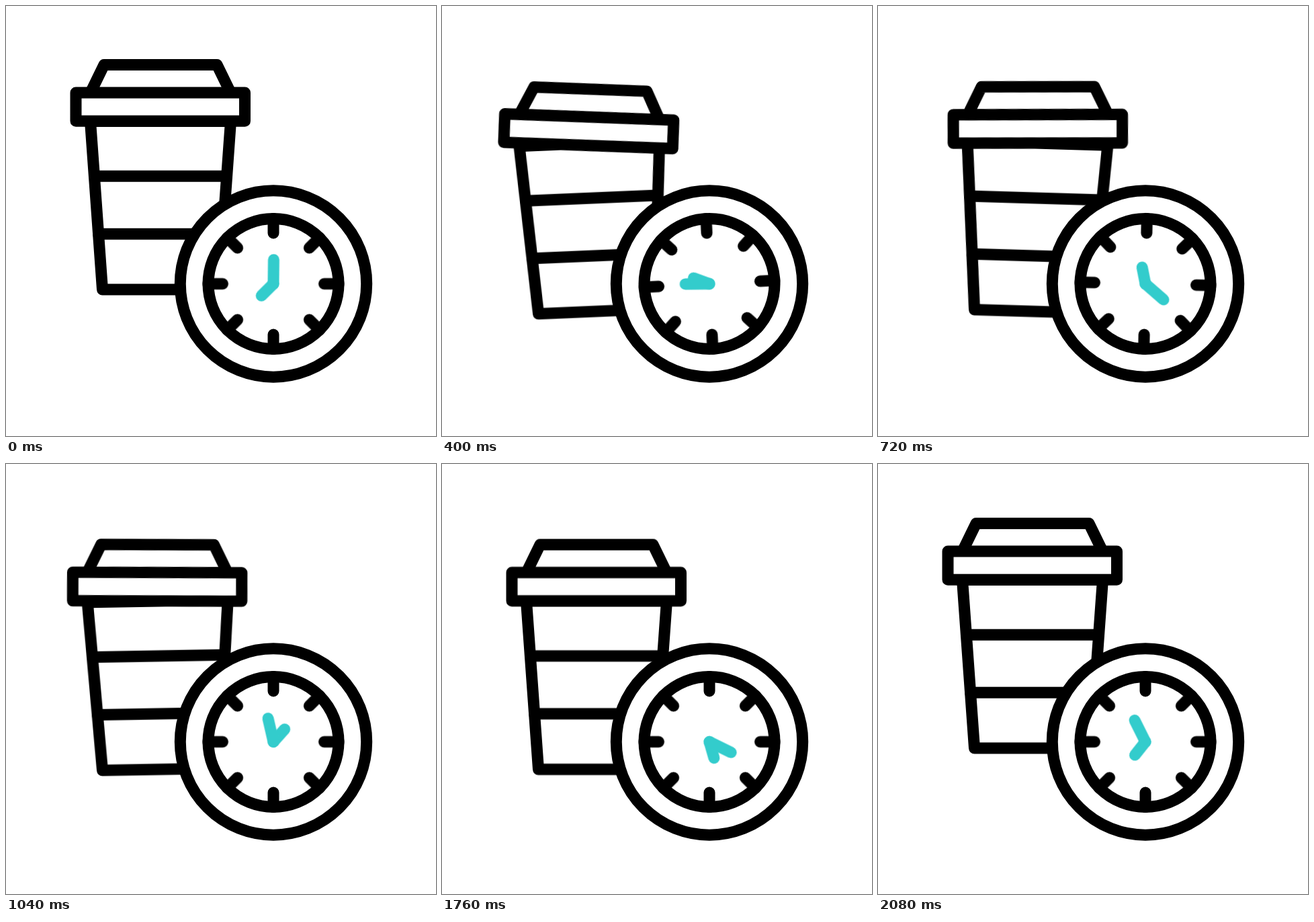
These frames come from a looping animation (640x640 px, 2120 ms). An HTML page without scripts:

```html
<!DOCTYPE html>
<html lang="en">
<head>
<meta charset="utf-8">
<title>Coffee time</title>
<style>
  @property --lean { syntax: "<angle>"; inherits: true; initial-value: 0deg; }
  @property --tilt { syntax: "<angle>"; inherits: true; initial-value: 0deg; }
  @property --push { syntax: "<length>"; inherits: true; initial-value: 0px; }

  html, body { margin: 0; width: 100%; height: 100%; overflow: hidden; background: #fff; }
  svg { display: block; width: 100%; height: 100%; }

  .line { fill: #fff; stroke: #000; stroke-width: 17; stroke-linecap: round; stroke-linejoin: round; }
  .hand { stroke: #3cc; }

  .drop, .cup, .lid, .dial, .hand {
    animation: 2120ms cubic-bezier(.37, 0, .63, 1) infinite;
  }
  .drop { animation-name: drop; }
  .cup  { animation-name: lean; transform-origin: 230px 422px; transform: rotate(var(--lean)); }
  /* the lid rides on the cup but keeps its own angle */
  .lid  {
    animation-name: tilt, push;
    transform-origin: 230px 150px;
    transform: translateY(var(--push)) rotate(calc(var(--tilt) - var(--lean)));
  }
  .dial { animation-name: shake; transform-origin: 398px 413.5px; }
  .hand { animation-name: turn; animation-timing-function: linear; transform-origin: 398px 413.5px; }
  .hour { --from: 225deg; --to: 585deg; }
  .minute { --from: 0deg; --to: 1440deg; }

  @keyframes drop {
    0%, 100% { transform: translateY(0); }
    3.8% { transform: translateY(-6px); }
    14.2%, 83% { transform: translateY(32.5px); }
  }
  @keyframes lean {
    0%, 53.8%, 100% { --lean: 0deg; }
    13.7% { --lean: -3.7deg; }
    30.7% { --lean: 2.3deg; }
    44.3% { --lean: -2deg; }
  }
  @keyframes tilt {
    0%, 71.7%, 100% { --tilt: 0deg; }
    11.3% { --tilt: 6.7deg; }
    26.4% { --tilt: -2.3deg; }
    41.5% { --tilt: 2.1deg; }
    56.6% { --tilt: -1.7deg; }
  }
  @keyframes push {
    0%, 11.3%, 26.4%, 100% { --push: 0px; }
    18.9% { --push: 3.5px; }
  }
  @keyframes shake {
    0%, 45.3%, 100% { transform: rotate(0deg); }
    14.2% { transform: rotate(-4deg); }
    30.7% { transform: rotate(1.6deg); }
  }
  @keyframes turn {
    from { transform: rotate(var(--from)); }
    to { transform: rotate(var(--to)); }
  }
</style>
</head>
<body>
<svg viewBox="0 0 640 640">
  <defs>
    <path id="tick" d="M398 316.5V338"/>
    <g id="quad">
      <use href="#tick"/>
      <use href="#tick" transform="rotate(90 398 413.5)"/>
      <use href="#tick" transform="rotate(180 398 413.5)"/>
      <use href="#tick" transform="rotate(270 398 413.5)"/>
    </g>
  </defs>

  <g class="line">
    <g class="drop">
      <g class="cup">
        <path d="M125.5 171.5H334.5L316.5 422H143.5Z"/>
        <path d="M131.5 253.3H328.5M137.5 339.3H322.5"/>
        <g class="lid">
          <path d="M125.5 129.5L146 87.5H314L334.5 129.5Z"/>
          <rect x="104" y="129" width="251.5" height="42.3"/>
        </g>
      </g>
    </g>

    <circle cx="398" cy="413.5" r="138.7"/>
    <circle cx="398" cy="413.5" r="97"/>
    <g class="dial">
      <use href="#quad"/>
      <use href="#quad" transform="rotate(45 398 413.5)"/>
      <path class="hand hour" d="M398 413.5V388.5"/>
      <path class="hand minute" d="M398 413.5V377.7"/>
    </g>
  </g>
</svg>
</body>
</html>
```
